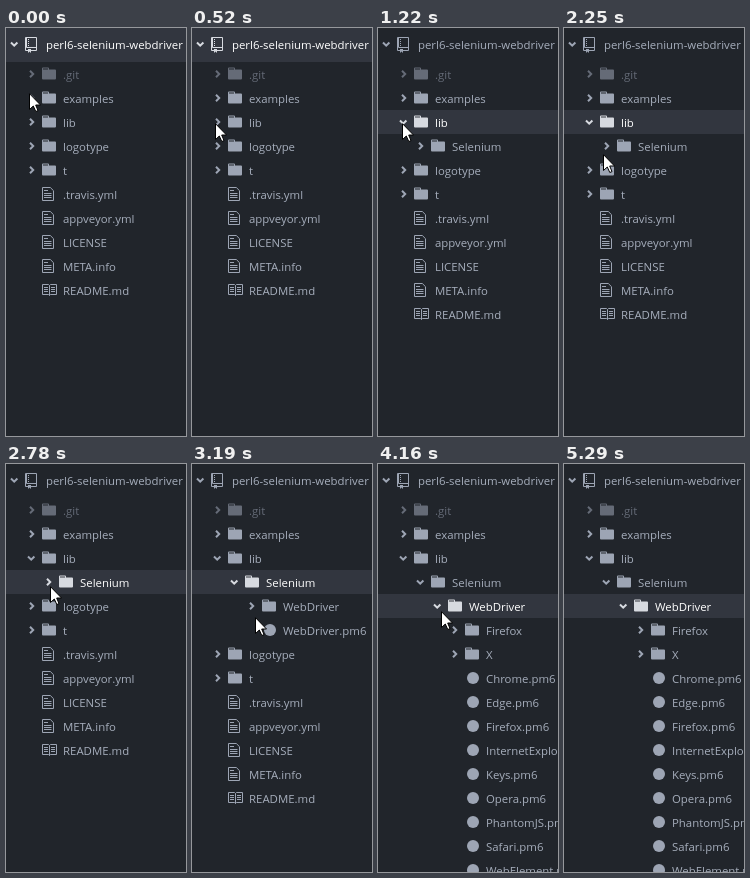
Animation of 180 by 408 pixels, one loop 6000 ms. Source, as an HTML page:

```html
<!DOCTYPE html>
<html lang="en">
<head>
<meta charset="utf-8">
<title>Project tree</title>
<style>
  html, body { margin: 0; width: 100%; height: 100%; overflow: hidden; background: #21252b; }
  svg { display: block; font: 11.4px "Open Sans", sans-serif; }
  .row { --ink: #9da5b4; --label: #a6aebc; }
  .row.dim { --ink: #656b77; --label: #656b77; }
  .row.selected { --ink: #d7dae0; --label: #fff; }
  .icon { fill: var(--ink); }
  .line { fill: none; stroke: var(--ink); }
  .chevron { stroke-width: 2; }
  text { fill: var(--label); }
</style>
</head>
<body>
<svg id="stage" width="180" height="408" viewBox="0 0 180 408"></svg>
<script>
const LOOP = 6000;
const TICK = 150;        // pointer refresh while gliding
const OPEN_DELAY = 120;  // from selecting a folder to showing its contents
const POINTER_GONE = 5290;
const stage = document.getElementById('stage');

// Each icon is drawn from the top left of its 16px slot.
const icons = {
  repo: `<path class="line" d="M6 13.5H11.5V.5H.5V13.5H3M1.5 .5V10.5H11.5"/>
    <path class="line" stroke-dasharray="1" d="M3.5 2V9"/><path d="M3 12H6V16L4.5 14.5 3 16Z"/>`,
  folder: `<path fill-rule="evenodd" d="M1 .5H6Q7 .5 7 1.5V2.5H13Q14 2.5 14 3.5V11.5Q14 12.5 13 12.5H1Q0 12.5 0 11.5V1.5Q0 .5 1 .5ZM1 1.5V2.5H6V1.5Z"/>`,
  file: `<path class="line" d="M.5 .5H8.3L11.5 3.7V13.5H.5ZM2 3.5H6M2 6.5H9.5M2 8.5H9.5M2 10.5H9.5"/>`,
  book: `<path class="line" d="M7.5 2.5L6.5 1.5H.5V11.5H6.5L7.5 12.5 8.5 11.5H14.5V1.5H8.5L7.5 2.5V12.5"/>
    <path class="line" d="M2 4.5H6M2 6.5H6M2 8.5H6M9 4.5H13M9 6.5H13M9 8.5H13"/>`,
  module: `<circle cx="8" cy="7" r="6"/>`
};

const list = (depth, icon, names) => names.split(' ').map(name => ({ depth, icon, name }));
const branch = (depth, icon, name) => ({ depth, icon, name, onPath: true });

const rows = [
  branch(0, 'repo', 'perl6-selenium-webdriver'),
  { depth: 1, icon: 'folder', name: '.git', dim: true },
  ...list(1, 'folder', 'examples'),
  branch(1, 'folder', 'lib'),
  branch(2, 'folder', 'Selenium'),
  branch(3, 'folder', 'WebDriver'),
  ...list(4, 'folder', 'Firefox X'),
  ...list(4, 'module', 'Chrome.pm6 Edge.pm6 Firefox.pm6 InternetExplorer.pm6 Keys.pm6 Opera.pm6 PhantomJS.pm6 Safari.pm6 WebElement.pm6'),
  ...list(3, 'module', 'WebDriver.pm6'),
  ...list(1, 'folder', 'logotype t'),
  ...list(1, 'file', '.travis.yml appveyor.yml LICENSE META.info'),
  ...list(1, 'book', 'README.md')
];

const clicks = [950, 2780, 4030];

// The pointer eases to each point in a few ticks and arrives at the given time.
const glides = [
  { at: 270, ticks: 2, x: 29, y: 84 },
  { at: 520, ticks: 2, x: 23, y: 95 },
  { at: 1220, ticks: 1, x: 24, y: 95 },
  { at: 2250, ticks: 1, x: 39, y: 126 },
  { at: 2660, ticks: 3, x: 44, y: 122 },
  { at: 3330, ticks: 2, x: 69, y: 163 },
  { at: 3600, ticks: 2, x: 68, y: 150 },
  { at: 3890, ticks: 1, x: 63, y: 147 },
  { at: 5130, ticks: 3, x: 133, y: 381 }
];

function pointerAt(time) {
  let x = 23, y = 65;
  for (const glide of glides) {
    const done = Math.floor((time - glide.at) / TICK) + glide.ticks;
    const left = 1 - Math.min(1, Math.max(0, done / glide.ticks));
    const eased = 1 - left * left;
    x += (glide.x - x) * eased;
    y += (glide.y - y) * eased;
  }
  return [Math.round(x), Math.round(y)];
}

function drawPointer(time) {
  if (time >= POINTER_GONE) return '';
  return `<path transform="translate(${pointerAt(time)})" fill="#fff" stroke="#000"
    d="M.5 .7V16.5L4.3 13 6.8 18.5 9 17.6 6.7 12H11.5Z"/>`;
}

function drawRow(item, index, selectedDepth, openDepth) {
  const { depth, icon, name, onPath, dim } = item;
  const top = index ? 10 + 24 * index : 0;
  const middle = index ? top + 12 : 16;
  const left = 2 + 17 * depth;
  const selected = onPath && depth === selectedDepth;
  const hasChevron = icon === 'folder' || icon === 'repo';
  const chevron = onPath && depth <= openDepth ? 'M3 -1.5L6.2 1.7 9.4 -1.5' : 'M5 -3.2L8.2 0 5 3.2';
  return `<g class="row ${selected ? 'selected' : dim ? 'dim' : ''}">
    ${selected ? `<rect y="${top}" width="180" height="${index ? 24 : 34}" fill="#32363f"/>` : ''}
    ${hasChevron ? `<path class="line chevron" transform="translate(${left} ${middle})" d="${chevron}"/>` : ''}
    <g class="icon" transform="translate(${left + 17} ${middle - 7})">${icons[icon]}</g>
    <text x="${left + 38}" y="${middle + 5}">${name}</text></g>`;
}

function drawTree(time) {
  const selectedDepth = clicks.filter(click => time >= click).length;
  const openDepth = clicks.filter(click => time >= click + OPEN_DELAY).length;
  return rows.filter(item => item.depth <= openDepth + 1)
    .map((item, i) => drawRow(item, i, selectedDepth, openDepth)).join('');
}

let shown;
function tick() {
  const time = performance.now() % LOOP;
  const picture = drawTree(time) + drawPointer(time);
  if (picture !== shown) stage.innerHTML = shown = picture;
  requestAnimationFrame(tick);
}
tick();
</script>
</body>
</html>
```
